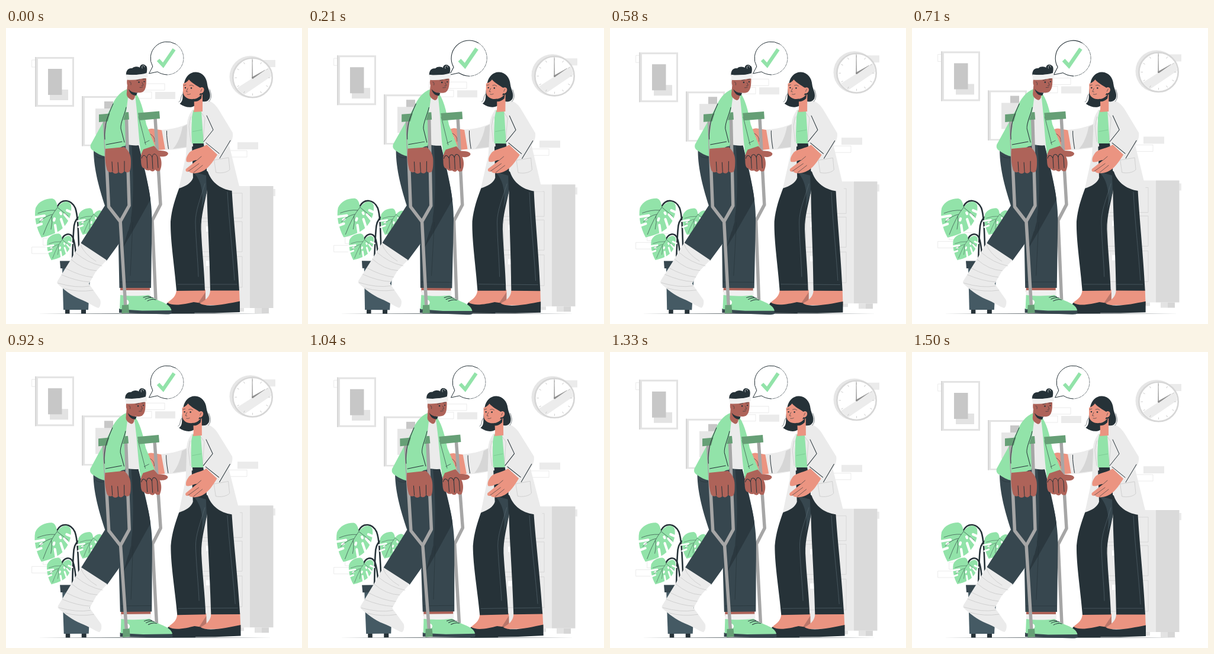
Animation of 500x500 px, one loop 1540 ms. Source, as an HTML page:

```html
<!DOCTYPE html>
<html lang="en">
<head>
<meta charset="utf-8">
<title>Recovery check</title>
<style>
html, body { margin: 0; width: 100%; height: 100%; overflow: hidden; background: #fff; }
svg { display: block; width: 100%; height: 100%; }
.g { fill: #92e3a9; }
.pad { fill: #669f76; }
.k { fill: #263238; }
.n { fill: #37474f; }
.c { fill: #ebebeb; }
.w { fill: #fff; }
.m { fill: #ae6359; }
.s { fill: #eb9481; }
.ink, .fine, .wrap, .tube, .seam, .box, .stem, .cut { fill: none; stroke-linecap: round; stroke-linejoin: round; }
.ink { stroke: #263238; stroke-width: 1; }
.fine { stroke: #263238; stroke-width: .6; }
.wrap { stroke: #b4b4b4; stroke-width: .5; }
.seam { stroke: #5a6b73; stroke-width: .6; }
.tube { stroke: #a6a6a6; stroke-width: 5.5; stroke-linecap: butt; }
.box { stroke: #e6e6e6; stroke-width: .8; }
.stem { stroke: #263238; stroke-width: 2.6; }
.cut { stroke: #fff; stroke-width: 4.2; }
</style>
</head>
<body>
<svg viewBox="0 0 500 500">
<defs>
  <clipPath id="face"><circle cx="416.5" cy="84" r="31.5"/></clipPath>
  <g id="leaf">
    <path class="g" d="M0 0C-1 -7 -3 -14 -9 -15C-21 -15 -32 -10 -37 1C-40 15 -36 35 -27 51C-15 48 -1 44 9 35C19 25 25 11 23 -4C19 -13 8 -11 0 0Z"/>
    <path class="cut" d="M-40 17L-22 14M-38 32L-27 28M25 9L16 5M21 23L12 12M11 35L6 20M-2 43L-4 30M-28 21L-26 20M-5 19L-6 22M5 9L6 11"/>
    <path class="fine" d="M0 0Q-13 16 -24 46M-4 5Q-18 4 -33 10M-9 12Q-20 14 -31 25M0 0Q9 7 18 15M-10 15Q-8 25 -11 37"/>
  </g>
</defs>
<rect class="w" width="500" height="500"/>

<g id="room">
  <path class="c" d="M430 54H455V66H430ZM252 108H286V120H252ZM391 193H426V205H391ZM440 272H455V284H440Z"/>
  <path class="box" d="M44 54H60V66H44ZM205 94H268V105H205ZM211 108H246V119H211ZM375 207H407V218H375ZM44 370H85V381H44ZM63 355H100V367H63Z"/>

  <path fill="#e3e3e3" d="M49 49H115V133H49Z"/>
  <path fill="#d6d6d6" d="M49 49H51V133H49Z"/>
  <path class="w" d="M54 52H112V130H54Z"/>
  <path fill="#e3e3e3" d="M74 104H105V122H74Z"/>
  <path fill="#c7c7c7" d="M71 69H94.500V113H71Z"/>

  <path fill="#e3e3e3" d="M128 115H194V199.500H128Z"/>
  <path fill="#d6d6d6" d="M128 115H130V199.500H128Z"/>
  <path class="w" d="M133 118H191V197H133Z"/>
  <path fill="#c7c7c7" d="M166 124H181V150H166Z"/>
  <path fill="#e6e6e6" d="M151 136H181V180H151Z"/>

  <circle cx="413" cy="82.500" r="35.500" fill="#e6e6e6"/>
  <circle cx="416.500" cy="84" r="33.200" class="w" stroke="#d6d6d6" stroke-width="2.600"/>
  <path clip-path="url(#face)" fill="#ececec" d="M380 108L452 62V79L393 119Z"/>
  <g id="ticks" stroke="#c4c4c4" stroke-width=".8"></g>
  <path d="M415.600 85L416 52L416.800 85Z" fill="#8c8c8c" stroke="#8c8c8c" stroke-width=".4"/>
  <path d="M415.500 83.200L437.500 71L417 85.400Z" fill="#8c8c8c" stroke="#8c8c8c" stroke-width=".4"/>
  <circle cx="416.500" cy="84" r="1.500" fill="#8c8c8c"/>

  <path fill="#e3e3e3" d="M391 473H402V479H391ZM420 473H432V482H420Z"/>
  <path fill="#d6d6d6" d="M432 473H444V482H432Z"/>
  <path class="c" d="M327 267H412V473H327Z"/>
  <path fill="#dadada" d="M412 267H451.500V473H412Z"/>
  <path class="box" style="stroke:#d2d2d2" d="M331 279H399V321H331ZM331 327H399V378H331ZM331 386H399V438H331Z"/>
  <path class="w" d="M338 335H346V344H338ZM338 393H346V402H338Z"/>
</g>

<path class="k" d="M53 482.200L250 481.800L451 482.200L250 482.700Z"/>

<g id="plant">
  <path class="k" d="M100 475H107.500V482.500H100ZM127 475H135V482.500H127Z"/>
  <path fill="#455a64" d="M95 404H143L139 476H97Z"/>
  <path class="n" d="M91 393.500H146V406H92Z"/>
  <path class="stem" d="M87 301C94 288 110 289 117 304C122 318 122 345 124 394"/>
  <path class="stem" d="M147 318C134 313 118 315 115 334C113 352 113 370 112 394"/>
  <path class="stem" d="M94 358C98 347 108 345 113 354C117 363 118 380 119 394"/>
  <use href="#leaf" transform="translate(87 303)"/>
  <use href="#leaf" transform="translate(95 357.500) scale(.68)"/>
  <use href="#leaf" transform="translate(148 314.500) scale(.68)"/>
</g>

<g id="bubble">
  <path class="w" d="M241.500 77L247.800 65A28 28 0 1 1 255.900 73.900Z"/>
  <path class="fine" stroke-dasharray="5 1.500" d="M286 26.800A28 28 0 0 1 272 79"/>
  <path class="ink" d="M286 26.800A28 28 0 0 0 247.800 65L241.500 77L255.900 73.900Q263 78.500 272 79"/>
  <path d="M257 54L265.500 63L284 36" fill="none" stroke="#92e3a9" stroke-width="6"/>
</g>

<g id="doctor">
  <!-- feet -->
  <path class="s" d="M288 442H337V468H272C271 460 287 460 288 442Z"/>
  <path fill="#b9766a" d="M325 464L337 446V466Z"/>
  <path class="k" d="M273 464C283 471 304 466 317 463L331 465L318 482H272C269 476 269 467 273 464Z"/>
  <path class="s" d="M345 442H394L395 468H325C328 462 345 460 345 442Z"/>
  <path class="k" d="M327 465C340 473 372 466 395 461.500V480L352 481.500H312C313 473 320 466 327 465Z"/>
  <!-- trousers -->
  <path class="k" d="M314 194H338L340 272C336 295 329 318 329.500 340C331 375 335 410 336 443.500L288 444C285 405 277.500 360 278 327C280 305 286 288 293 269L314 250Z"/>
  <path class="k" d="M337 240L360 255L381.500 274C384 320 391 385 394 443.500H345C344 380 340 320 339.500 278Z"/>
  <path class="n" d="M316 243L338 249L339 278L330 305C334 280 331 258 316 243Z"/>
  <path class="seam" d="M336 263C328 290 320 308 320 328C321 365 324 390 325 420M290 433H334M346 433H390M374 277C376 320 383 380 386 426"/>
  <!-- far hand and sleeve -->
  <path class="s" d="M266 173L247 170C241 170 236 172 238 177L246 186L243 196L253 207L270 205Z"/>
  <path class="fine" d="M241 178C247 180 252 185 251 192"/>
  <path class="c" d="M263 172C283 171 300 166 313 158L316 200C300 203 284 206 269 206Z"/>
  <path fill="#d6d6d6" d="M298 167L312 160L313 200L282 204C290 196 296 180 298 167Z"/>
  <path class="ink" d="M271.500 174C271 184 273 194 274.500 204"/>
  <!-- shirt and coat -->
  <path class="g" d="M314 139L333 138L335 195H313Z"/>
  <path fill="none" stroke="#70bd88" stroke-width=".6" d="M315 175L331 172"/>
  <path class="c" d="M317 136C309 145 305 155 306 171L304 215L292 271C304 267 313 262 316 253L314 195L312 160Z"/>
  <path class="c" d="M332 121C344 121 353 127 360 139L383 177C384 186 381 191 377 198L396 275.500C371 277 349 266 341 243L334 196L330 141Z"/>
  <path class="wrap" d="M352 223L376 219L378 239C374 244 363 246 355 244ZM330 143L336 152L333 190M312 150L309 166L312 192"/>
  <path class="ink" d="M339 148L350 172L334 192M338 194L360 212M379 190L361 220"/>
  <!-- near hand -->
  <path class="s" d="M339 197C331 203 316 204 310 210C306 215 303 221 305 226C312 228 319 222 323 223L304 238C302 242 306 244 309 242C310 245 317 246 322 245C338 243 347 230 357 214Z"/>
  <path class="fine" d="M326 229L308 242M332 232L317 244M323 223L330 217"/>
  <!-- head -->
  <path class="k" d="M301 93C303 82 311 74 321 74.500C332 75 339 84 340 95C341 104 347 110 344 119C341 124 337 125 331 124L319 131C312 136 302 134 293.500 128C300 123 298 116 299 106Z"/>
  <path class="fine" d="M298 112C294 117 297 122 292 125M344 104C347 112 348 118 343 124"/>
  <path class="s" d="M318 116L332 112V141L317 142C319 133 317 127 318 116Z"/>
  <path class="k" d="M313 120C321 121 327 117 331 111L330 119C325 124 320 125 316 124Z"/>
  <path class="s" d="M299 94C303 93 307 90 309 87C314 93 322 97 328 101C333 98 336 103 334 107C332 111 329 111 328 110C326 117 319 121 311 120C304 119 299 114 299 107Z"/>
  <path class="fine" d="M300 97L304 96M310 97Q314 95 317 98M307 102L304.500 107.500L307 108M306 112Q309 113 311.500 111.500M331 103L329 107"/>
  <circle class="k" cx="303" cy="101" r="1.200"/>
  <circle class="k" cx="313" cy="101.500" r="1.300"/>
</g>

<g id="patient">
  <!-- far crutch -->
  <path class="tube" d="M252 152L261 298L247 325L253 460"/>
  <!-- standing leg -->
  <path class="m" d="M193 437H243V446H193Z"/>
  <path fill="#f0f0f0" d="M193 443H244V456H193Z"/>
  <path class="n" d="M191 474H277L280 480C280 483 277 483.500 270 483.500L191 481Z"/>
  <path class="g" d="M193 451C208 453 226 453 241 451C252 461 277 463 279.500 477L230 477.500L192 475Z"/>
  <path class="w" d="M203 459A4.500 4.500 0 0 1 203 468Z"/>
  <path class="ink" d="M232 455Q239 452 245 454M235 458Q242 454 249 456M239 461Q246 457 253 459"/>
  <path class="n" d="M205 197L224 198C233 232 247 285 246.500 325L245 439H191.500L190 368L196 320Z"/>
  <path fill="#2b383f" d="M212 198L224 198C230 230 242 266 244 290L213 345L197 372L211 327Z"/>
  <path class="fine" d="M214 328L210 418M193 429H244"/>
  <!-- bent leg -->
  <path class="n" d="M148 206C148 240 159 275 167 300C152 324 138 345 126 364L170 393L207 342C215 310 217 265 212 197H170Z"/>
  <path class="fine" d="M151 215C153 219 160 220 166 219"/>
  <!-- cast -->
  <path class="c" d="M126 363L170 392L152 411L140 432L159 459C161 464 159 472 156 473C149 471 140 464 125 458C110 452 98 442 87 432C85 429 88 426 91 421L109 392Z"/>
  <path class="wrap" d="M118 380Q138 397 162 402M110 391Q130 409 153 410M101 406Q125 419 146 421M94 417Q120 428 141 429M88 431Q118 440 141 436M98 440Q122 447 147 443M126 366Q132 382 152 394"/>
  <!-- shirt, jacket -->
  <path class="c" d="M203 114L221 116L226 198C218 199 210 198 201 196Z"/>
  <path class="g" d="M217 107C227 118 232 138 237 163L252 200L228 213C223 180 223 145 217 107Z"/>
  <path class="g" d="M205 103C192 108 183 120 177 135L143 197C142 202 143 204 147 207C154 212 161 216 168 217L203 196L202 150L206 118Z"/>
  <path class="fine" d="M224 150L236 197M234 194L242 190"/>
  <path class="pad" d="M223 143.500L259 140.500L260 153L225 156Z"/>
  <!-- far hand -->
  <path class="m" d="M232 205L250 199L257 207C266 207 273 208 274 212C273 217 265 218 260 217C264 225 263 235 260 241C256 243 253 241 252 239C250 243 246 243 243 240C240 241 236 241 234 237C229 237 228 230 228 224C227 216 229 211 232 205Z"/>
  <path class="ink" d="M229 220C231 213 235 214 238 220L239 237M238 219C239 211 245 212 247 219L248 238M247 218C248 210 254 212 256 219L257 236"/>
  <!-- near crutch -->
  <path class="tube" d="M166.500 157L173.500 302L193 327L208 300L203.500 153M193 325L202 472"/>
  <path class="pad" d="M157 146L207 142L208 154.500L157 159ZM196 468L207 467.500L208 481L195.500 482Z"/>
  <!-- near arm -->
  <path class="g" d="M187 119C199 113 205 120 204 132C202 148 193 162 196 176L202 199L168 205C165 187 168 168 177 140Z"/>
  <path class="ink" d="M181 128C172 148 165 165 167 188M203 134C200 148 193 160 194 170L200 193M169 197L196 192"/>
  <path class="m" d="M168 204L200 201C207 207 211 214 211 224C211 232 211 240 208 243C204 245 201 243 200 241C198 246 193 247 190 243C188 247 182 247 180 243C175 245 171 243 170 237C167 226 167 214 168 204Z"/>
  <path class="ink" d="M179 226L180 242M189 227L190 243M200 225L200 241"/>
  <!-- head -->
  <path class="m" d="M205 97L221 103L218 115C217 121 214 123 211 121C206 118 203 115 204 109Z"/>
  <path class="k" d="M207 103C211 108 216 110 222 109L220 114C213 114 209 110 207 103Z"/>
  <path class="m" d="M205 85H237C237 95 237 104 231 108C224 111 214 109 210 101C205 100 203 94 205 85Z"/>
  <path class="k" d="M203 80C202 73 206 67 213 68C217 64 224 65 226 67C226 62 232 60 235 63C239 64 239 71 237 78Z"/>
  <path class="fine" style="stroke:#fff" d="M230 68C228 63 234 61 234 66"/>
  <path fill="#f0f0f0" d="M203 78.500Q222 81 239 75.500L239.500 83Q222 89 204 87.500Z"/>
  <path class="fine" d="M221 88.500L226 87M231 86.500L235 86M230 92L232 96.500L229 97.500M226 100.500Q229 101 231 99.500M209 91Q212 91 211 96"/>
  <circle class="k" cx="224.500" cy="91.500" r="1.300"/>
  <circle class="k" cx="233.500" cy="90.500" r="1.100"/>
</g>
</svg>
<script>
const $ = id => document.getElementById(id);
const LOOP = 1540, CYCLE = 1500;

for (let i = 0; i < 12; i++) {
  const mark = document.createElementNS('http://www.w3.org/2000/svg', 'path');
  mark.setAttribute('d', 'M416.500 54V57.500');
  mark.setAttribute('transform', `rotate(${i * 30} 416.5 84)`);
  $('ticks').append(mark);
}

// Linear interpolation through [position, value] stops
function along(stops, p) {
  const i = Math.max(1, stops.findIndex(s => s[0] >= p));
  const [a, x] = stops[i - 1], [b, y] = stops[i];
  return x + (y - x) * (p - a) / (b - a);
}

const drift = [[0, 0], [.5, -10], [1, 0]];
const sway = [[0, 0], [.25, 1], [.75, -1], [1, 0]];
const beat = [[0, 1], [.1, 1.1], [.3, 1], [.4, 1], [.5, 1.1], [.6, 1], [1, 1]];
const pivots = { plant: '106 385', doctor: '320 278', patient: '183 272' };

function draw(ms) {
  const p = Math.min(1, ms % LOOP / CYCLE);
  $('room').setAttribute('transform', `translate(0 ${along(drift, p)})`);
  $('bubble').setAttribute('transform',
    `translate(270.5 50) scale(${along(beat, p)}) translate(-270.5 -50)`);
  const angle = along(sway, p);
  for (const id in pivots) $(id).setAttribute('transform', `rotate(${angle} ${pivots[id]})`);
}

let start;
function tick(now) {
  start ??= now;
  draw(now - start);
  requestAnimationFrame(tick);
}
draw(0);
requestAnimationFrame(tick);
</script>
</body>
</html>
```
